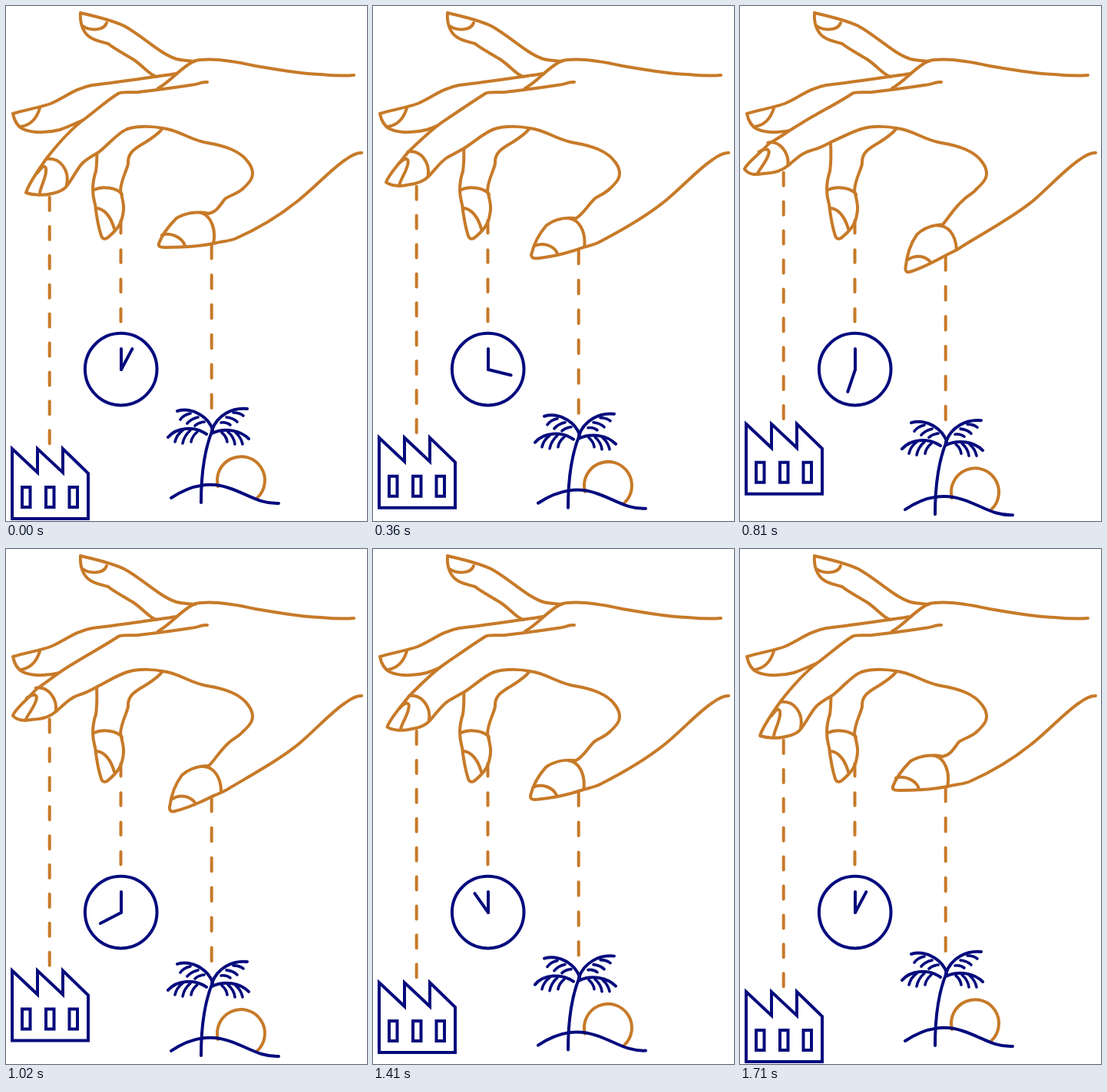
An HTML page for the animation above (1.74 s loop, 470 px wide and 670 px high).

```html
<!DOCTYPE html>
<html lang="en">
<head>
<meta charset="utf-8">
<style>
html, body { margin: 0; height: 100%; overflow: hidden; background: #fff; }
svg { display: block; width: 470px; height: 670px; fill: none; stroke-width: 4; stroke-linecap: round; stroke-linejoin: round; }
.hand { stroke: #c77a28; }
.blue { stroke: #050b7d; }
.sharp { stroke-linejoin: miter; stroke-linecap: butt; }
.barbs { stroke-width: 3.6; }
</style>
</head>
<body>
<svg viewBox="0 0 470 670">
  <g class="hand">
    <path d="M149.500 279V413" stroke-dasharray="16.500 21.800"/>
    <path id="ropeL" d="M56.700 249V569.500" stroke-dasharray="17 20.900"/>
    <path id="ropeR" d="M267.700 311V523" stroke-dasharray="17.500 21.400"/>
  </g>

  <g class="hand">
    <!-- little and ring fingers, back of the hand -->
    <path d="M97 9C115 13 137 18 154 26C178 39 200 62 222 69C230 71 238 71 246 72"/>
    <path d="M97 9C96 22 100 35 110 41C118 46 127 47 133 49C140 55 152 61 165 69C180 79 187 90 196 92"/>
    <path d="M100 26C108 32 127 33 131 22"/>
    <path d="M198 107C215 98 230 77 247 71C265 67 290 70 325 78C360 84 390 89 410 89C430 91 440 91 453 90"/>
    <path d="M222 88C180 94 140 100 112 103C90 107 75 120 58 127C45 132 25 135 9 140C11 150 16 157 22 160C35 166 55 165 70 161C82 157 92 152 101 148"/>
    <path d="M44 133C40 146 33 155 19 157"/>
    <!-- middle finger -->
    <path d="M118 179C119 200 118 208 117 215C112 230 112 245 116 258C118 275 121 290 124 299C126 304 130 304 134 300C142 293 150 285 152 272C155 260 151 250 149 240C150 225 157 215 159 205C158 190 170 184 182 177C190 172 198 167 204 159"/>
    <path d="M115 239C125 234 145 236 151 245M117 263C128 263 137 275 141 290"/>
    <path id="index" fill="#fff"/>
    <path id="indexNail"/>
    <path d="M262 99C255 98 252 102 240 103C220 106 190 110 172 112C160 113 150 111 146 114"/>
    <path d="M158 160C175 155 195 157 204 159C225 161 238 174 262 178C285 182 305 188 316 204C327 220 318 229 308 238"/>
    <path id="thumb"/>
    <path id="thumbNail"/>
  </g>

  <g class="blue">
    <circle cx="149.700" cy="472.600" r="46.800"/>
    <path d="M150 446V473"/>
    <path id="hour" d="M150 473V442.500"/>
  </g>

  <g id="factory" class="blue sharp">
    <path d="M8 576L41 607V576L74 607V576L107 608V667H8Z"/>
    <path d="M21 626h10.500v26h-10.500zM52 626h10.500v26h-10.500zM82.500 626h10.500v26h-10.500z"/>
  </g>

  <g id="palm" class="blue">
    <path class="hand" d="M276 625A31 31 0 1 1 327 640"/>
    <path d="M215 640C245 620 270 620 290 627C315 635 330 648 355 647"/>
    <path d="M254 646C254 610 259 575 269 551"/>
    <path d="M269 551C262 532 240 522 223 527M261 557C245 546 222 548 211 561M268 552C275 532 295 522 314 524M268 556C285 548 305 552 316 563"/>
    <g class="barbs">
      <path d="M240 530Q231 532 227 538M250 535Q241 537 236 543M258 541Q250 542 246 546"/>
      <path d="M230 552Q222 558 220 567M240 552Q232 559 230 569M249 554Q242 560 241 567"/>
      <path d="M296 529Q304 529 309 533M287 535Q296 536 301 541M280 542Q287 541 292 545"/>
      <path d="M299 555Q306 561 308 570M289 554Q297 561 298 570M281 555Q287 560 288 567"/>
    </g>
  </g>
</svg>
<script>
const $ = id => document.getElementById(id);
const FRAME = 30, LOOP = 1740, SPAN = LOOP - FRAME;
const LIFT = 34, DROP = 16, REACH = 27.2; // REACH: factory lift at the second pose

// Each part: low pose, raised pose
const poses = {
  index: [
    "M146 114C131 123 116 137 101 148C85 160 67 180 53 198C43 212 29 232 26 243C35 246 50 247 60 244C70 242 77 238 80 233C90 220 92 212 100 204C105 199 114 194 121 190C135 179 145 165 158 160",
    "M146 114C128 126 105 138 83 152C68 161 55 172 40 182C28 196 12 208 9 217C15 224 25 224 35 222C50 221 58 218 66 211C78 200 85 193 95 190C105 187 112 183 119 179C133 172 145 164 158 160"],
  indexNail: [
    "M53 199C71 197 83 214 79 233M41 217C46 210 50 206 52 211C54 220 46 232 44 243",
    "M39 181C55 178 67 195 65 211M27 194C33 190 39 188 40 193C40 203 29 214 26 222"],
  thumb: [
    "M308 238C300 245 290 247 285 251C278 260 274 268 264 270C248 266 232 270 222 276C210 288 203 298 199 309C198 314 202 314 210 314C225 314 250 313 270 309C282 306 290 306 298 303C330 289 360 270 383 251C405 233 425 211 442 200C450 194 456 191 463 191",
    "M308 238C303 244 295 247 290 252C278 263 273 273 264 282C250 282 238 286 229 294C220 306 215 320 213 335C212 340 215 342 219 341C232 338 250 331 270 321C280 317 285 315 291 311C323 292 358 273 383 252C405 233 425 211 442 200C450 194 456 191 463 191"],
  thumbNail: [
    "M253 269C266 271 274 290 270 309M203 298C214 294 230 301 233 312",
    "M256 283C270 283 280 296 280 316M216 325C228 318 240 322 246 330"]
};

function blend([low, high], k) {
  const ends = high.match(/\d+/g);
  let i = 0;
  return low.replace(/\d+/g, n => (+n + (ends[i++] - n) * k).toFixed(2) + " ");
}

const shift = (id, y) => $(id).setAttribute("transform", `translate(0 ${y})`);

function draw(now) {
  const u = Math.floor(now % LOOP / FRAME) * FRAME / SPAN;
  const rise = 1 - Math.abs(1 - 2 * u);
  for (const id in poses) $(id).setAttribute("d", blend(poses[id], rise * LIFT / REACH));
  for (const id of ["factory", "ropeL"]) shift(id, -rise * LIFT);
  for (const id of ["palm", "ropeR"]) shift(id, rise * DROP);
  $("hour").setAttribute("transform", `rotate(${28 + 360 * u} 150 473)`);
}

let start;
function tick(now) {
  start ??= now;
  draw(now - start);
  requestAnimationFrame(tick);
}
draw(0);
requestAnimationFrame(tick);
</script>
</body>
</html>
```
